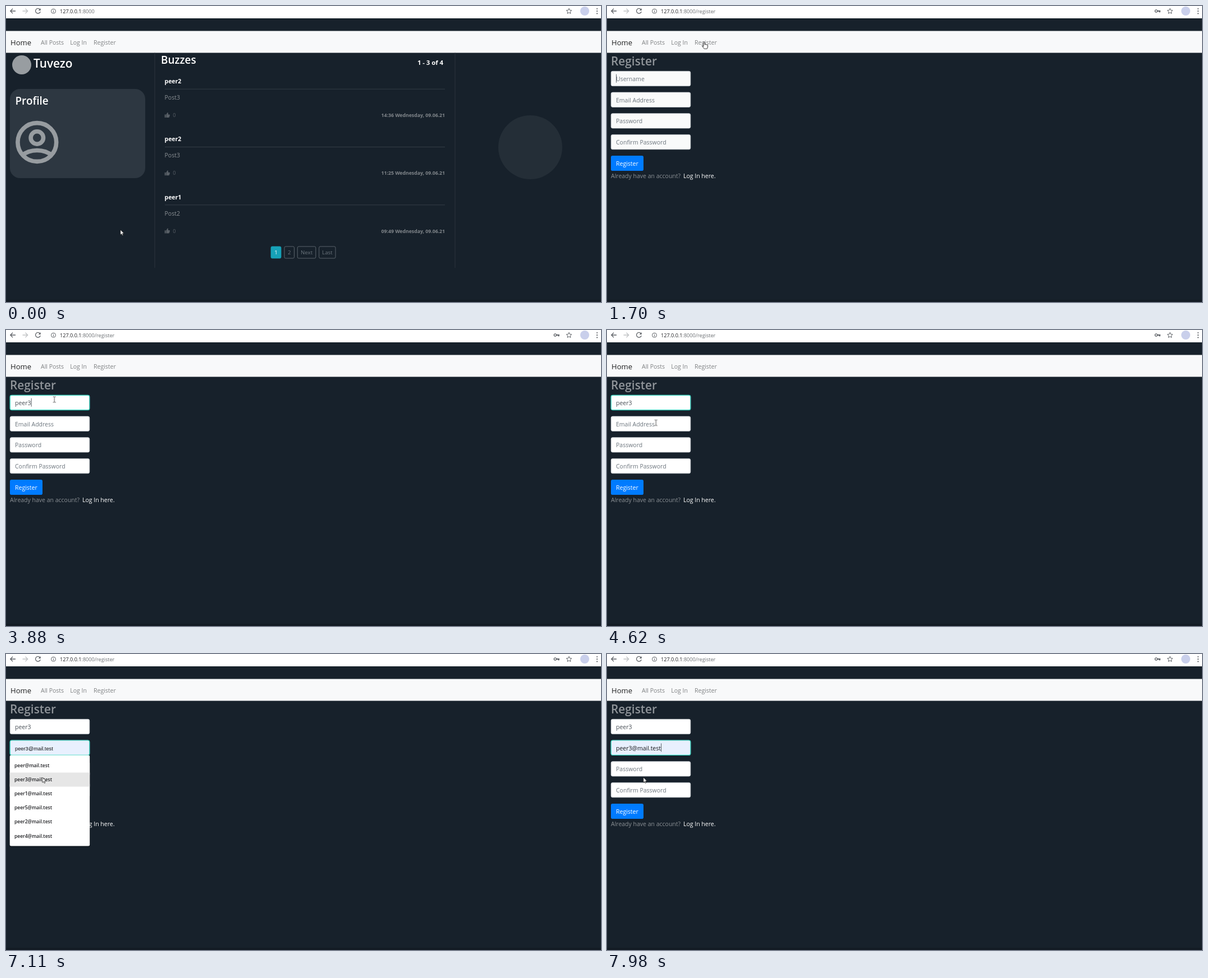
These frames come from a looping animation (1060 px wide and 528 px high, 8000 ms). An HTML page:

```html
<!DOCTYPE html>
<html lang="en">
<head>
<meta charset="utf-8">
<title>Register</title>
<style>
  html, body { margin: 0; width: 100%; height: 100%; overflow: hidden; background: #17212b; }
  svg { display: block; width: 1060px; height: 528px; }
  text { font: 10.5px "Open Sans", "Noto Sans", sans-serif; white-space: pre; }
  .url { font-size: 9.1px; fill: #6b6f73; }
  .brand { font-size: 13.1px; fill: #1f2021; }
  .nav { fill: #7f8183; }
  .title { font-size: 20.8px; font-weight: 600; fill: #fff; }
  .heading { font-size: 18.9px; font-weight: 600; fill: #fff; }
  .bold { font-weight: 700; fill: #fff; }
  .post { fill: #8b9095; }
  .stamp { font-size: 8.7px; font-weight: 700; fill: #81868b; text-anchor: end; }
  .likes { font-size: 9px; fill: #596067; }
  .page { font-size: 9.7px; fill: #6c757d; text-anchor: middle; }
  .hint { fill: #6c757d; }
  .typed { fill: #495057; }
  .option { font-size: 8.5px; font-weight: 600; fill: #202124; }
  .preview { font: 9.3px "Liberation Sans", Arial, sans-serif; fill: #111; }
  .icon { fill: none; stroke: #5f6368; stroke-width: 1.3; }
  .rule { stroke: #2c353e; }
</style>
</head>
<body>
<svg viewBox="0 0 1060 528">
  <defs>
    <path id="arrow" d="M0 0V9.3L2.1 7.4L3.5 10.5L5 9.8L3.6 6.8H6.4Z" fill="#fff" stroke="#111" stroke-width=".7"/>
    <path id="hand" d="M-1 8V.6Q0-.8 1 .6V4.4Q2 3.6 3 4.7Q4 4 4.8 5.1Q6.2 4.6 6.5 6V9L5.2 12H.2L-3.2 7.8Q-3.4 6.3-2 6.8Z" fill="#fff" stroke="#222" stroke-width=".9"/>
    <path id="beam" d="M-2.5-5H-.6L0-4.4L.6-5H2.5M0-4.4V4.4M-2.5 5H-.6L0 4.4L.6 5H2.5" fill="none" stroke="#444" stroke-width=".9"/>
    <path id="thumb" d="M0 3.6H2V9H0ZM2.7 3.8L5 0Q6.6 0 6.2 2L5.8 3.4H8.4Q9.5 3.6 9.2 5L8.2 8.2Q7.9 9 7 9H2.7Z" fill="#596067"/>
  </defs>

  <rect width="1060" height="528" fill="#17212b"/>
  <rect y="524" width="1060" height="4" fill="#131b24"/>
  <rect width="1060" height="22" fill="#fff"/>
  <rect y="44.5" width="1060" height="39" fill="#f8f9fa"/>

  <g class="icon">
    <path d="M17 9H8M12 4.8L7.8 9L12 13.2"/>
    <path d="M29.5 9H38.5M34.5 4.8L38.7 9L34.5 13.2" stroke="#c1c3c5"/>
    <path d="M60.4 6.1A4.4 4.4 0 1 0 61.2 10"/>
    <path d="M61.7 4V8H57.7Z" fill="#5f6368" stroke="none"/>
    <circle cx="84.5" cy="9.2" r="4" stroke-width="1"/>
    <path d="M84.5 6.8V7.8M84.5 8.6V11.6" stroke-width="1"/>
    <path id="star" stroke-width="1"/>
    <g id="key"><circle cx="978.4" cy="9" r="2.1"/><path d="M980.6 9H986M984.6 9V11.4" stroke-width="1.8"/></g>
  </g>
  <circle cx="1031" cy="9" r="8" fill="#c9cfeb"/>
  <path d="M1053 5H1053M1053 9.2H1053M1053 13.4H1053" stroke="#5f6368" stroke-width="2.2" stroke-linecap="round"/>
  <text class="url" x="96" y="13"><tspan fill="#202124">127.0.0.1</tspan>:8000<tspan id="route">/register</tspan></text>

  <text class="brand" x="8" y="70">Home</text>
  <text class="nav" x="62" y="69">All Posts</text>
  <text class="nav" x="114.3" y="69">Log In</text>
  <text class="nav" id="registerLink" x="156" y="69">Register</text>

  <g id="home">
    <circle cx="28" cy="105" r="17" fill="#989da1"/>
    <text class="title" x="49" y="110">Tuvezo</text>
    <rect x="7" y="148" width="241" height="159" rx="18" fill="#2d3741"/>
    <text class="heading" x="16.5" y="176">Profile</text>
    <g fill="none" stroke="#979ca0" stroke-width="7.6">
      <circle cx="55.3" cy="243" r="34.4"/>
      <circle cx="55.3" cy="235" r="11.2"/>
      <path d="M28 267Q39 257.5 55.3 257.5T82.6 267"/>
    </g>
    <path class="rule" d="M265 83.5V467M800 83.5V467"/>
    <text class="heading" x="276" y="103">Buzzes</text>
    <text class="bold" x="779" y="105" text-anchor="end" style="font-size:11.3px">1 - 3 of 4</text>
    <g id="posts"></g>
    <g id="pages"></g>
    <circle cx="934" cy="252" r="57" fill="#242e37"/>
  </g>

  <g id="form">
    <text class="title" x="7" y="106" style="fill:#8f9499">Register</text>
    <g id="fields"></g>
    <rect x="7" y="267" width="58" height="27" rx="2.8" fill="#007bff"/>
    <text x="16" y="284.5" fill="#fff">Register</text>
    <text x="7" y="306.5" fill="#8b9095">Already have an account?</text>
    <text x="136" y="306.5" fill="#fff">Log In here.</text>
  </g>
  <g id="menus"></g>
  <g id="pointers"></g>
</svg>

<script>
const LOOP = 8000, PAGE_SWITCH = 1580;
const $ = id => document.getElementById(id);

function add(parent, tag, attrs, content = '') {
  const node = document.createElementNS('http://www.w3.org/2000/svg', tag);
  for (const name in attrs) node.setAttribute(name, attrs[name]);
  node.textContent = content;
  return parent.appendChild(node);
}

// Holds each [time, value] until the next one.
function track(node, property, points) {
  const frames = points.map(([time, value]) =>
    ({ offset: time / LOOP, [property]: value, easing: 'step-end' }));
  frames.push({ offset: 1, [property]: points.at(-1)[1] });
  node.animate(frames, { duration: LOOP, iterations: Infinity });
}

function show(node, ...spans) {
  const points = spans[0][0] > 0 ? [[0, 0]] : [];
  for (const [from, to = LOOP] of spans) {
    points.push([from, 1]);
    if (to < LOOP) points.push([to, 0]);
  }
  track(node, 'opacity', points);
}

// Browser bar
$('star').setAttribute('d', 'M' + Array.from({ length: 10 }, (_, i) => {
  const r = i % 2 ? 2.3 : 5, a = i * Math.PI / 5;
  return [1003 + r * Math.sin(a), 9.4 - r * Math.cos(a)].map(n => n.toFixed(2));
}).join('L') + 'Z');
show($('key'), [PAGE_SWITCH]);
show($('route'), [PAGE_SWITCH]);
track($('registerLink'), 'fill',
  [[0, '#7f8183'], [1000, '#4b4c4d'], [PAGE_SWITCH, '#7f8183'], [1820, '#4b4c4d'], [2160, '#7f8183']]);

// Home page
show($('home'), [0, PAGE_SWITCH]);
[['peer2', 'Post3', '14:36'], ['peer2', 'Post3', '11:25'], ['peer1', 'Post2', '09:49']]
  .forEach(([author, body, time], i) => {
    const post = add($('posts'), 'g', { transform: `translate(0 ${i * 103.3})` });
    add(post, 'text', { class: 'bold', x: 282.5, y: 138 }, author);
    add(post, 'path', { d: 'M283 148.2H782', stroke: '#343d46' });
    add(post, 'text', { class: 'post', x: 282.5, y: 167 }, body);
    add(post, 'use', { href: '#thumb', x: 282.7, y: 190 });
    add(post, 'text', { class: 'likes', x: 297.3, y: 198 }, '0');
    add(post, 'text', { class: 'stamp', x: 782, y: 198 }, `${time} Wednesday, 09.06.21`);
  });
[['1', 472, 18], ['2', 496, 17.5], ['Next', 519.3, 32.5], ['Last', 557.7, 29.3]]
  .forEach(([label, x, width], i) => {
    const active = i === 0;
    add($('pages'), 'rect', {
      x, y: 429, width, height: 21, rx: 2.2, 'stroke-width': .8,
      fill: active ? '#17a2b8' : 'none', stroke: active ? '#17a2b8' : '#6c757d'
    });
    const text = add($('pages'), 'text', { class: 'page', x: x + width / 2, y: 443.2 }, label);
    if (active) text.style.fill = '#fff';
  });

// Register form
show($('form'), [PAGE_SWITCH]);
const fieldTop = i => 116.3 + i * 37.7;
const fieldBox = i => ({ x: 7.2, y: fieldTop(i), width: 141.6, height: 26.4, rx: 2.8 });
const fieldText = (i, kind, content) =>
  add($('fields'), 'text', { class: kind, x: 16, y: fieldTop(i) + 17.6 }, content);

const hints = ['Username', 'Email Address', 'Password', 'Confirm Password'].map((label, i) => {
  const box = add($('fields'), 'rect', { ...fieldBox(i), fill: '#fff', stroke: '#ced4da', 'stroke-width': .7 });
  track(box, 'fill', [[0, '#f9fafa'], [1820, '#fff']]);
  return fieldText(i, 'hint', label);
});
show(hints[0], [PAGE_SWITCH, 3000]);
show(hints[1], [PAGE_SWITCH, 5570]);

const filled = add($('fields'), 'rect', { ...fieldBox(1), fill: '#e8f0fe' });
show(filled, [6990]);
[[0, 1820, 4890], [1, 4890, LOOP]].forEach(([i, from, to]) => {
  const ring = add($('fields'), 'rect', { ...fieldBox(i), fill: 'none', stroke: '#2fd3bd', 'stroke-width': 1.2 });
  show(ring, [from, to]);
});

// Each entry: field, text, time it appears, time it goes, spans in which the caret is on.
const typing = [
  [0, '', 1700, 3000, [1700, 2300], [2720, 3000]],
  [0, 'p', 3000, 3140, [3000, 3140]],
  [0, 'pe', 3140, 3290, [3140, 3290]],
  [0, 'pee', 3290, 3590, [3290, 3590]],
  [0, 'peer', 3590, 3740, [3590, 3740]],
  [0, 'peer3', 3740, LOOP, [3740, 4320]],
  [1, '', 4890, 5570, [4890, 5430]],
  [1, 'p', 5570, 5710, [5570, 5710]],
  [1, 'pe', 5710, 5850, [5710, 5850]],
  [1, 'pee', 5850, 5980, [5850, 5980]],
  [1, 'peer', 5980, 6990, [5980, 6570]],
  [1, 'peer3@mail.test', 7700, LOOP, [7700, LOOP]]
];
for (const [i, content, from, to, ...caretSpans] of typing) {
  const text = fieldText(i, 'typed', content);
  if (from === 7700) text.style.fill = '#16181b';
  const x = 16.2 + (content ? text.getComputedTextLength() : 0);
  const caret = add($('fields'), 'rect', { x, y: fieldTop(i) + 5.4, width: .9, height: 15, fill: '#495057' });
  show(text, [from, to]);
  show(caret, ...caretSpans);
}
[['peer@mail.test', 6990, 7110], ['peer3@mail.test', 7110, 7700]].forEach(([content, from, to]) =>
  show(fieldText(1, 'preview', content), [from, to]));

// Suggestion menus
const ROW = 25.1;
function menu(top, options, from, to, hovers = []) {
  const group = add($('menus'), 'g', {});
  add(group, 'rect', { x: 6, y: top + 1, width: 144, height: 163, rx: 3, fill: '#000', opacity: .25 });
  add(group, 'rect', { x: 6.7, y: top, width: 142.5, height: 162, rx: 2.5, fill: '#fff' });
  hovers.forEach(([row, start, end]) => {
    const mark = add(group, 'rect', { x: 6.7, y: top + 6 + row * ROW, width: 142.5, height: ROW, fill: '#e6e6e6' });
    show(mark, [start, end]);
  });
  options.forEach((label, i) =>
    add(group, 'text', { class: 'option', x: 15, y: top + 21.6 + i * ROW }, label));
  show(group, [from, to]);
}
const peers = order => order.map(n => 'peer' + n);
menu(142.3, peers(['', 2, 3, 1, 4, 5]), 3000, 3740);
menu(180.4, peers(['', 3, 1, 5, 2, 4]).map(name => name + '@mail.test'), 5570, 7700,
  [[0, 6990, 7110], [1, 7110, 7700]]);

// Pointer: time, shape, hot spot
const moves = [
  [0, 'arrow', 203.8, 399], [120, 'arrow', 204.5, 366.5],
  [520, 'arrow', 182, 330], [640, 'arrow', 122, 212], [760, 'arrow', 52, 92],
  [880, 'hand', 104, 60], [1000, 'hand', 173, 64.2],
  [2160, 'arrow', 150, 86], [2300, 'beam', 104, 122], [2440, 'beam', 86.2, 124],
  [4320, 'beam', 86.4, 137], [4470, 'beam', 87, 160], [4620, 'beam', 87.2, 165.5],
  [6870, 'arrow', 80, 184], [6990, 'arrow', 70, 204], [7110, 'arrow', 64.8, 220]
];
moves.forEach(([time, shape, x, y], i) => {
  const pointer = add($('pointers'), 'use', { href: '#' + shape, x, y });
  show(pointer, [time, moves[i + 1]?.[0]]);
});
</script>
</body>
</html>
```
